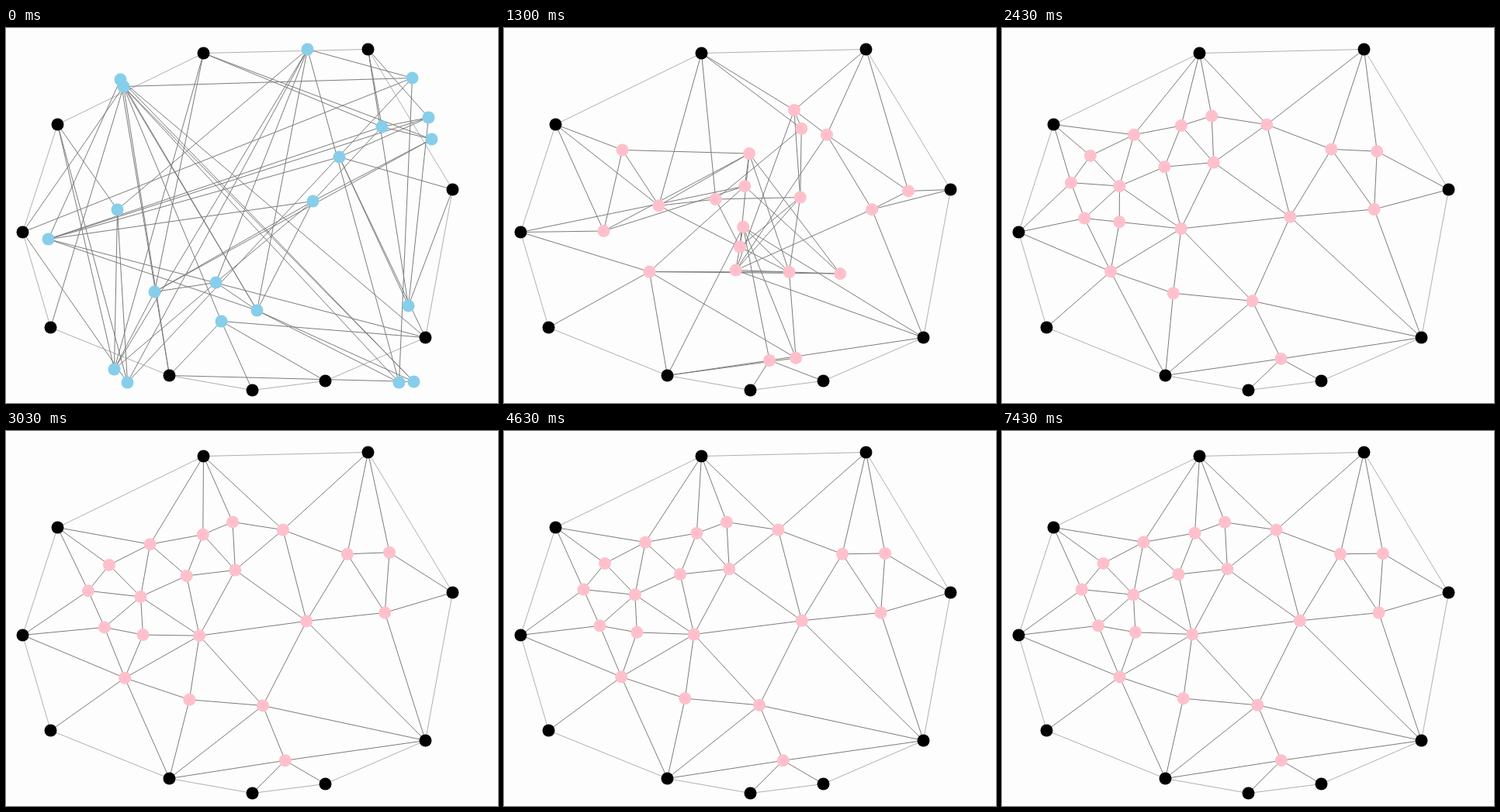
Write an HTML page with a canvas that moves like this. It is 634 by 484 pixels and loops after 7460 ms.

```html
<!DOCTYPE html>
<html lang="en">
<head>
<meta charset="utf-8">
<title>Spring graph untangling</title>
<style>
  html, body { margin: 0; width: 100%; height: 100%; overflow: hidden; background: #fdfdfd; }
  canvas { display: block; }
</style>
</head>
<body>
<canvas id="stage" width="634" height="484"></canvas>
<script>
const WIDTH = 634, HEIGHT = 484, LOOP = 7460, START = 900, RADIUS = 8;
const STEP = 5, STIFFNESS = 12.6, DAMPING = 5.8;
const ctx = document.getElementById("stage").getContext("2d");

// Nodes are numbered in base 36: 0-9 are the pinned rim, a-t swing freely.
const rim = [[254, 32], [466, 27], [575, 208], [540, 399], [411, 455],
  [317, 467], [210, 448], [57, 386], [21, 263], [66, 124]];

// Starting point of each free node and the nodes it is tied to.
const free = {
  a: [139, 440, "09begh"], b: [191, 340, "0chi"], c: [548, 143, "0di"],
  d: [484, 127, "01ipq"], e: [143, 234, "9fg"], f: [156, 457, "89gj"],
  g: [388, 27, "hjkl"], h: [270, 328, "il"], i: [395, 223, "lp"],
  j: [523, 64, "8km"], k: [506, 457, "lm"], l: [323, 364, "mnop"],
  m: [151, 75, "678n"], n: [525, 456, "6o"], o: [147, 66, "36pt"],
  p: [54, 272, "3qs"], q: [544, 115, "1rs"], r: [518, 358, "12s"],
  s: [429, 166, "23"], t: [277, 378, "3456"]
};

const springs = Object.entries(free).flatMap(([id, [, , ties]]) =>
  [...ties].map(tie => [parseInt(id, 36), parseInt(tie, 36)]));
const rimEdges = rim.map((_, i) => [i, (i + 1) % rim.length]);

const points = [...rim, ...Object.values(free)];
const bodies = points.map(([x, y], i) => ({ x, y, vx: 0, vy: 0, mobility: i < rim.length ? 0 : 1 }));

// Zero-length spring with a damper acting along its own direction.
function pull(a, b, dt) {
  const dx = b.x - a.x, dy = b.y - a.y, length = Math.hypot(dx, dy) || 1;
  const nx = dx / length, ny = dy / length;
  const mobility = a.mobility + b.mobility;
  const speed = (b.vx - a.vx) * nx + (b.vy - a.vy) * ny;
  const brake = speed * (1 - Math.exp(-DAMPING * dt * mobility)) / mobility;
  const impulse = STIFFNESS * length * dt + brake;
  a.vx += impulse * nx * a.mobility;
  a.vy += impulse * ny * a.mobility;
  b.vx -= impulse * nx * b.mobility;
  b.vy -= impulse * ny * b.mobility;
}

function advance(dt) {
  for (const [i, j] of springs) pull(bodies[i], bodies[j], dt);
  for (const body of bodies) {
    body.x += body.vx * dt;
    body.y += body.vy * dt;
  }
}

// The whole swing is worked out once, so each picture depends on time alone.
const history = [];
for (let t = START; t <= LOOP; t += STEP) {
  history.push(bodies.map(({ x, y }) => [x, y]));
  advance(STEP / 1000);
}

function drawEdges(list, pos, color) {
  ctx.beginPath();
  for (const [i, j] of list) {
    ctx.moveTo(...pos[i]);
    ctx.lineTo(...pos[j]);
  }
  ctx.strokeStyle = color;
  ctx.stroke();
}

function drawNodes(list, color) {
  ctx.fillStyle = color;
  for (const [x, y] of list) {
    ctx.beginPath();
    ctx.arc(x, y, RADIUS, 0, 2 * Math.PI);
    ctx.fill();
  }
}

function draw(t) {
  const pos = history[Math.max(0, Math.floor((t - START) / STEP))];
  ctx.setTransform(1, 0, 0, 1, 0, 0);
  ctx.fillStyle = "#fdfdfd";
  ctx.fillRect(0, 0, WIDTH, HEIGHT);
  ctx.translate(0.5, 0.5);
  drawEdges(rimEdges, pos, "#b0b0b0");
  drawEdges(springs, pos, "#7c7c7c");
  drawNodes(rim, "black");
  drawNodes(pos.slice(rim.length), t < START ? "skyblue" : "pink");
}

const origin = performance.now();
function tick() {
  draw((performance.now() - origin) % LOOP);
  requestAnimationFrame(tick);
}
tick();
</script>
</body>
</html>
```
